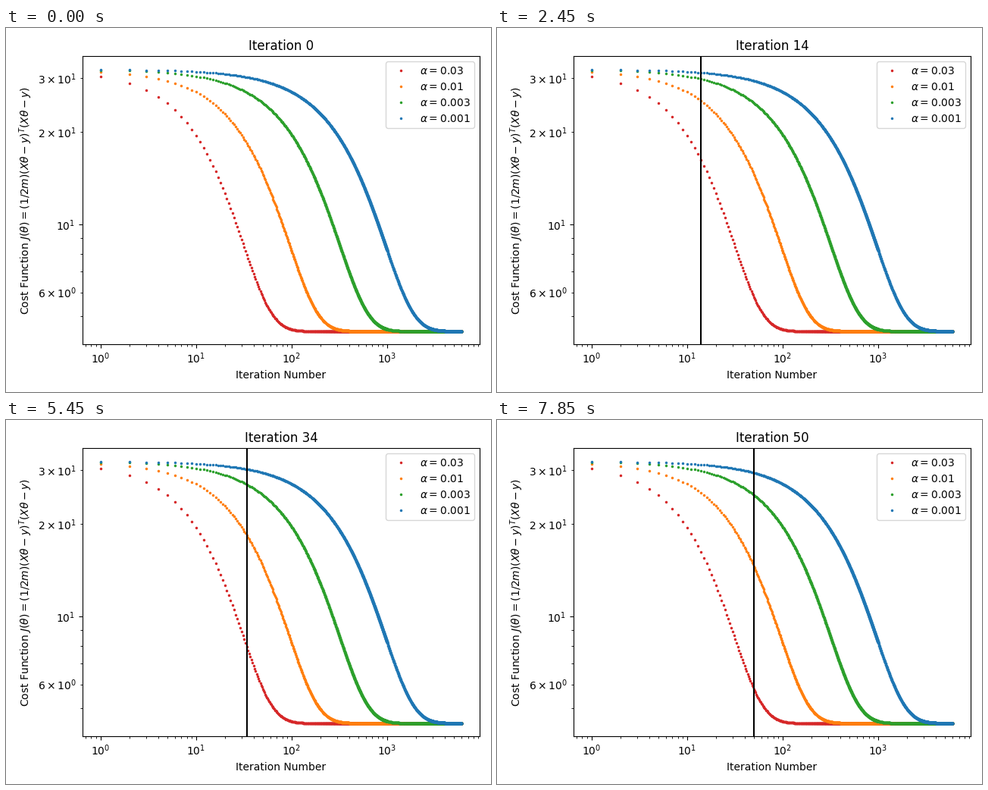
Recreate the animation shown at these times as a matplotlib script. Size 640 by 480 pixels, loop 8 s.

```python
import numpy as np
import matplotlib.pyplot as plt
from matplotlib.animation import FuncAnimation

TICK = 50            # ms per animation tick
LOOP = 8000          # ms
HOLD, STEP = 500, 150  # ms on iteration 0, then ms per iteration

START_COST, MIN_COST = 32.0727, 4.47697
RUNS = [(0.03, "tab:red"), (0.01, "tab:orange"),
        (0.003, "tab:green"), (0.001, "tab:blue")]

plt.rcParams["font.family"] = "DejaVu Sans"


def cost(alpha, k):
    """Cost after k gradient descent steps on a normalised feature."""
    return MIN_COST + (START_COST - MIN_COST) * (1 - alpha) ** (2 * k)


def iteration_at(ms):
    return 0 if ms < HOLD else 1 + (ms - HOLD) // STEP


fig, ax = plt.subplots(figsize=(6.4, 4.8), dpi=100)
ax.set_xscale("log")
ax.set_yscale("log")

# Late points overlap heavily, so every fifth one is enough there.
steps = np.r_[0:1000, 1000:6001:5]
for alpha, color in RUNS:
    ax.plot(steps, cost(alpha, steps), ".", ms=3, color=color,
            label=rf"$\alpha = {alpha}$")

ax.set_xlabel("Iteration Number")
ax.set_ylabel(r"Cost Function $J(\theta)=(1/2m)(X\theta-y)^T(X\theta-y)$")
title = ax.set_title("Iteration 0")
ax.legend(loc="upper right")
fig.tight_layout()

ax.set_xlim(ax.get_xlim())
ax.set_ylim(ax.get_ylim())
marker = ax.axvline(1, color="black", lw=1.5, visible=False)


def update(tick):
    k = iteration_at(tick * TICK)
    title.set_text(f"Iteration {k}")
    marker.set_visible(k > 0)
    marker.set_xdata([max(k, 1)] * 2)
    return title, marker


anim = FuncAnimation(fig, update, frames=LOOP // TICK, interval=TICK,
                     repeat=True, repeat_delay=0, blit=False)
plt.show()
```
